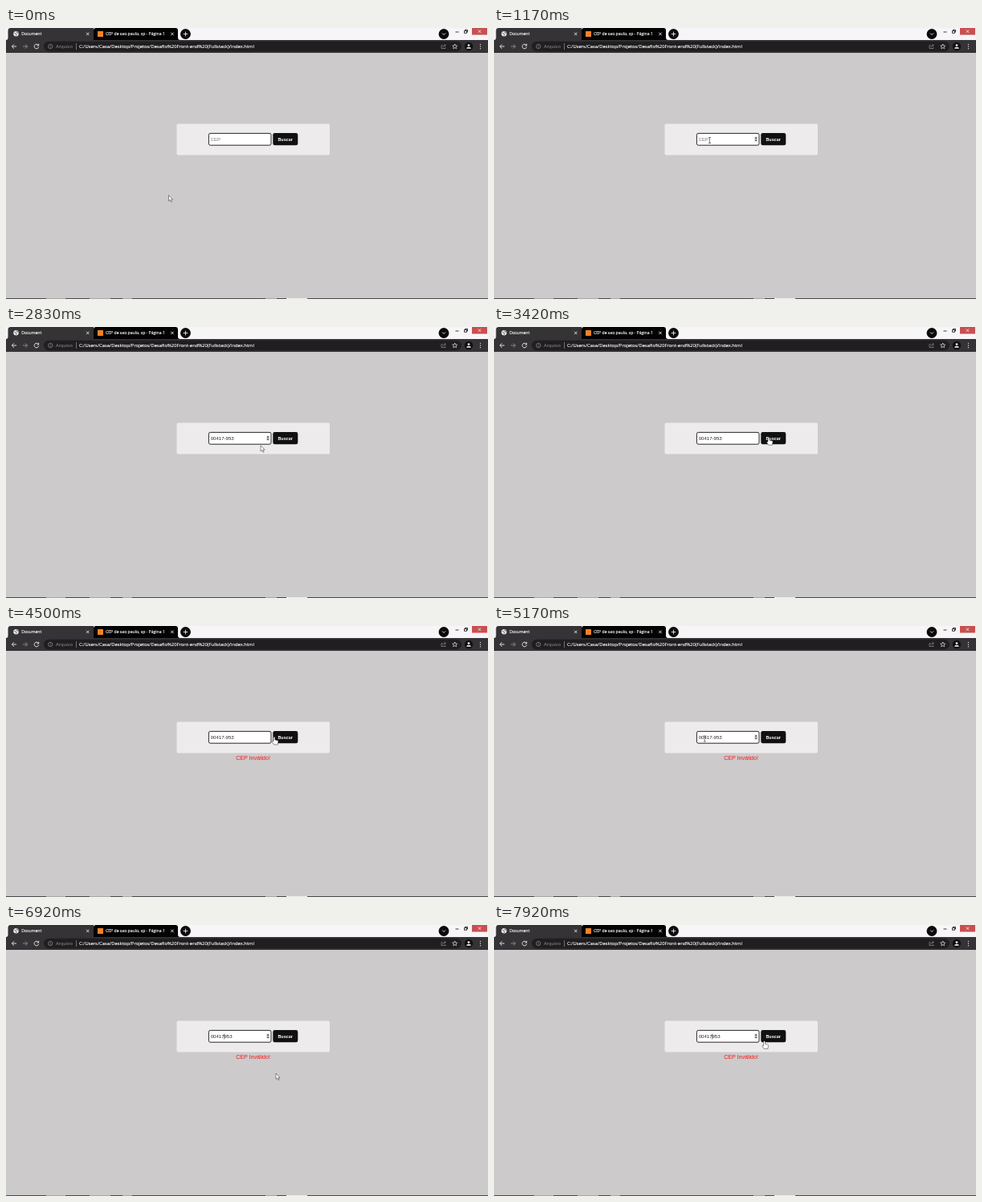
An HTML page for the animation above (8000 ms loop, 600x338 px).

```html
<!DOCTYPE html>
<html lang="pt">
<head>
<meta charset="utf-8">
<title>CEP</title>
<style>
  html, body { margin: 0; width: 100%; height: 100%; overflow: hidden; background: #cdcacb; }
  svg { display: block; width: 600px; height: 338px; }
  text { white-space: pre; }
  .ui { font-family: "Open Sans", "Noto Sans", sans-serif; fill: #fff; stroke: #fff; stroke-width: .12; }
  .page { font-family: "Liberation Sans", Arial, sans-serif; }
  .line { fill: none; stroke: #eee; stroke-width: .9; }
  .thin { stroke-width: .7; }
  .dim { stroke: #949295; }
</style>
</head>
<body>
<svg viewBox="0 0 600 338">
  <defs>
    <path id="cross" class="line" d="M-1.7-1.7L1.7 1.7M1.7-1.7L-1.7 1.7"/>
    <circle id="disc" r="6.4" fill="#0a0a0a"/>
  </defs>
  <rect width="600" height="338" fill="#cdcacb"/>

  <!-- tab strip -->
  <rect width="600" height="15" fill="#f7f5f8"/>
  <path d="M0 15Q2.500 15 2.500 12V3Q2.500 0 6 0H109V15Z" fill="#353336"/>
  <path d="M109 15V3Q109 0 112 0H211Q214 0 214 3V12Q214 15 217 15Z" fill="#030303"/>
  <circle cx="12.500" cy="7.300" r="3.200" fill="#eee"/>
  <path d="M10.400 6.400l2 .6 .7 1.600-1 1.300M13 4.500l.5 1.300 1.800.3" fill="none" stroke="#454346" stroke-width=".8"/>
  <rect x="114" y="4" width="7" height="7" fill="#f5822a"/>
  <g class="ui" font-size="5.130">
    <text x="19.300" y="9.200">Document</text>
    <text x="124" y="9.200">CEP de sao paulo, sp - Página 1</text>
  </g>
  <use href="#cross" x="101.700" y="7.400"/>
  <use href="#cross" x="207" y="7.400"/>
  <use href="#disc" x="223.500" y="7.500"/>
  <path class="line" d="M220.700 7.500h5.600M223.500 4.700v5.600"/>
  <use href="#disc" x="545" y="7.500"/>
  <path class="line" d="M543 6.500l2 2 2-2"/>
  <path d="M559.500 5h4M570.500 3.500h3v2.800h-3zM571.500 3.500v-1.200h3v2.800h-1" fill="none" stroke="#222" stroke-width=".9"/>
  <rect x="580" width="19" height="8.500" fill="#c94f50"/>
  <use href="#cross" x="589.500" y="4.200"/>

  <!-- toolbar -->
  <rect y="15" width="600" height="16" fill="#353336"/>
  <rect x="47" y="16.800" width="520" height="12.400" rx="6.200" fill="#201e21"/>
  <path class="line" d="M13 23H7.500M10 20.300L7.300 23l2.700 2.700"/>
  <path class="line dim" d="M21 23h5.500M24 20.300l2.700 2.700-2.700 2.700"/>
  <path class="line" d="M40.200 21.300A2.800 2.800 0 1 0 40.700 23.600M40.700 19.800v2.200h-2.200"/>
  <circle class="line dim thin" cx="55.300" cy="23" r="2.700"/>
  <path class="line dim thin" d="M55.300 22.600v1.900M55.300 21.200v.7"/>
  <path class="line dim thin" d="M87.500 19v8"/>
  <g class="ui" font-size="5.850">
    <text x="62" y="25.100" style="fill:#9a989b;stroke:none">Arquivo</text>
    <text x="91" y="25.100">C:/Users/Casa/Desktop/Projetos/Desafio%20Front-end%20(Fullstack)/index.html</text>
  </g>
  <path class="line dim thin" d="M543.500 21.500h-1.500v4h5v-1.500M543.800 24q.5-2.500 3.200-2.500M545.700 19.900l1.700 1.600-1.700 1.600"/>
  <path class="line thin" d="M558.700 20l.9 2 2.100.2-1.600 1.400.5 2.100-1.900-1.100-1.900 1.100.5-2.100-1.600-1.400 2.100-.2z"/>
  <circle cx="576" cy="23" r="5.200" fill="#101010"/>
  <circle cx="576" cy="21.600" r="1.400" fill="#eee"/>
  <path d="M573.200 25.700q0-2 2.800-2t2.800 2z" fill="#eee"/>
  <path d="M590.500 20.300v6" stroke="#eee" stroke-width="1.300" stroke-linecap="round" stroke-dasharray="0 2.700"/>

  <!-- page -->
  <rect x="212.500" y="119.500" width="190.500" height="39" rx="2" fill="#eeebec"/>
  <rect x="252.400" y="131.400" width="77.600" height="14.800" rx="2" fill="#fff" stroke="#111" stroke-width=".9"/>
  <rect x="332.300" y="131" width="31" height="15.300" rx="2.200" fill="#111"/>
  <g class="page">
    <text x="338.400" y="140.700" font-size="5.450" font-weight="bold" fill="#fff">Buscar</text>
    <text id="field" x="254.700" y="141" font-size="6.050"></text>
    <text id="error" x="286.200" y="166.500" font-size="7.070" fill="#f51a1a">CEP Inválido!</text>
  </g>
  <g id="spinner">
    <rect x="323.800" y="135" width="4.600" height="7.400" fill="#eee"/>
    <path d="M324.500 138l1.600-2.200 1.600 2.200zM324.500 139.300l1.600 2.200 1.600-2.200z" fill="#444"/>
  </g>
  <rect id="caret" y="135.500" width=".6" height="7" fill="#333"/>

  <!-- screen edge -->
  <rect y="337" width="600" height="1" fill="#4a484b"/>
  <path d="M50 337.500h24M104 337.500h26M145 337.500h12M323 337.500h14" stroke="#aaa8a9"/>
  <path d="M349 337.500h26" stroke="#eee"/>

  <path id="arrow" d="M0 0V7.300L1.700 5.800 2.900 8.500 4.100 8 2.900 5.400H5.100Z" fill="#fff" stroke="#444" stroke-width=".6"/>
  <path id="beam" d="M-1.500-3.500H1.500M0-3.500V3.500M-1.500 3.500H1.500" fill="none" stroke="#444" stroke-width=".7"/>
  <path id="hand" d="M-1-.5Q0-1.500 1-.5V2.700L4.400 3.600Q5.200 3.900 5 5L4.400 8.700H-.4L-2.600 5.300Q-2.500 3.900-1 4.800Z" fill="#fff" stroke="#222" stroke-width=".5"/>
</svg>
<script>
const LOOP = 8000, TICK = 1000 / 12, BLINK = 500;
const CODE = "00417-953", CUT = CODE.indexOf("-");
const TEXT_X = 254.7, DIGIT = 3.36, HYPHEN = 2.01;

const CLICK = 660, PASTE = 2160, BLUR = 3320, FAIL = 3490, REFOCUS = 5740, ERASE = 6825;

const origin = { x: 202.5, y: 208.5 };
const moves = [
  { from: 0, to: 580, x: 268.5, y: 140 },
  { from: 1333, to: 1750, x: 271.7, y: 164.5 },
  { from: 2333, to: 3170, x: 342, y: 138.5 },
  { from: 4417, to: 4917, x: 231, y: 149 },
  { from: 4917, to: 5250, x: 268, y: 139 },
  { from: 5250, to: 5583, x: 274, y: 139 },
  { from: 5917, to: 6167, x: 352, y: 175 },
  { from: 6167, to: 6250, x: 336, y: 185 },
  { from: 7500, to: 7917, x: 336.5, y: 145.7 }
];

const el = id => document.getElementById(id);
const show = (id, on) => el(id).setAttribute("visibility", on ? "visible" : "hidden");
const between = (v, a, b) => v >= a && v < b;
const ease = k => k * k * (3 - 2 * k);

function pointerAt(t) {
  let { x, y } = origin;
  for (const m of moves) {
    const k = ease(Math.min(1, Math.max(0, (t - m.from) / (m.to - m.from))));
    x += (m.x - x) * k;
    y += (m.y - y) * k;
  }
  return { x, y };
}

// Each action on the field restarts the blinking.
function caretOn(t) {
  const since = [ERASE, REFOCUS, PASTE, CLICK].find(action => t >= action);
  return (t - since) % (2 * BLINK) < BLINK;
}

function caretX(t) {
  if (t < PASTE) return TEXT_X;
  const middle = TEXT_X + CUT * DIGIT;
  if (t < BLUR) return TEXT_X + (CODE.length - 1) * DIGIT + HYPHEN + .2;
  return t < ERASE ? middle + HYPHEN : middle;
}

function draw(t) {
  const { x, y } = pointerAt(t);
  const inRow = between(y, 131, 147);
  const overField = inRow && between(x, 252, 330.5);
  const overButton = inRow && between(x, 332, 363.5);
  const kind = overField ? "beam" : overButton ? "hand" : "arrow";
  for (const id of ["arrow", "beam", "hand"]) show(id, id === kind);
  el(kind).setAttribute("transform", `translate(${x} ${y})`);

  const filled = t >= PASTE;
  const field = el("field");
  field.textContent = !filled ? "CEP" : t < ERASE ? CODE : CODE.replace("-", "");
  field.setAttribute("fill", filled ? "#222" : "#777");

  const focused = between(t, CLICK, BLUR) || t >= REFOCUS;
  show("spinner", focused || overField);
  show("error", t >= FAIL);
  show("caret", focused && caretOn(t));
  el("caret").setAttribute("x", caretX(t));
}

const start = performance.now();
function frame(now) {
  const t = Math.max(0, now - start) % LOOP;
  draw(Math.floor((t + 5) / TICK) * TICK);
  requestAnimationFrame(frame);
}
draw(0);
requestAnimationFrame(frame);
</script>
</body>
</html>
```
